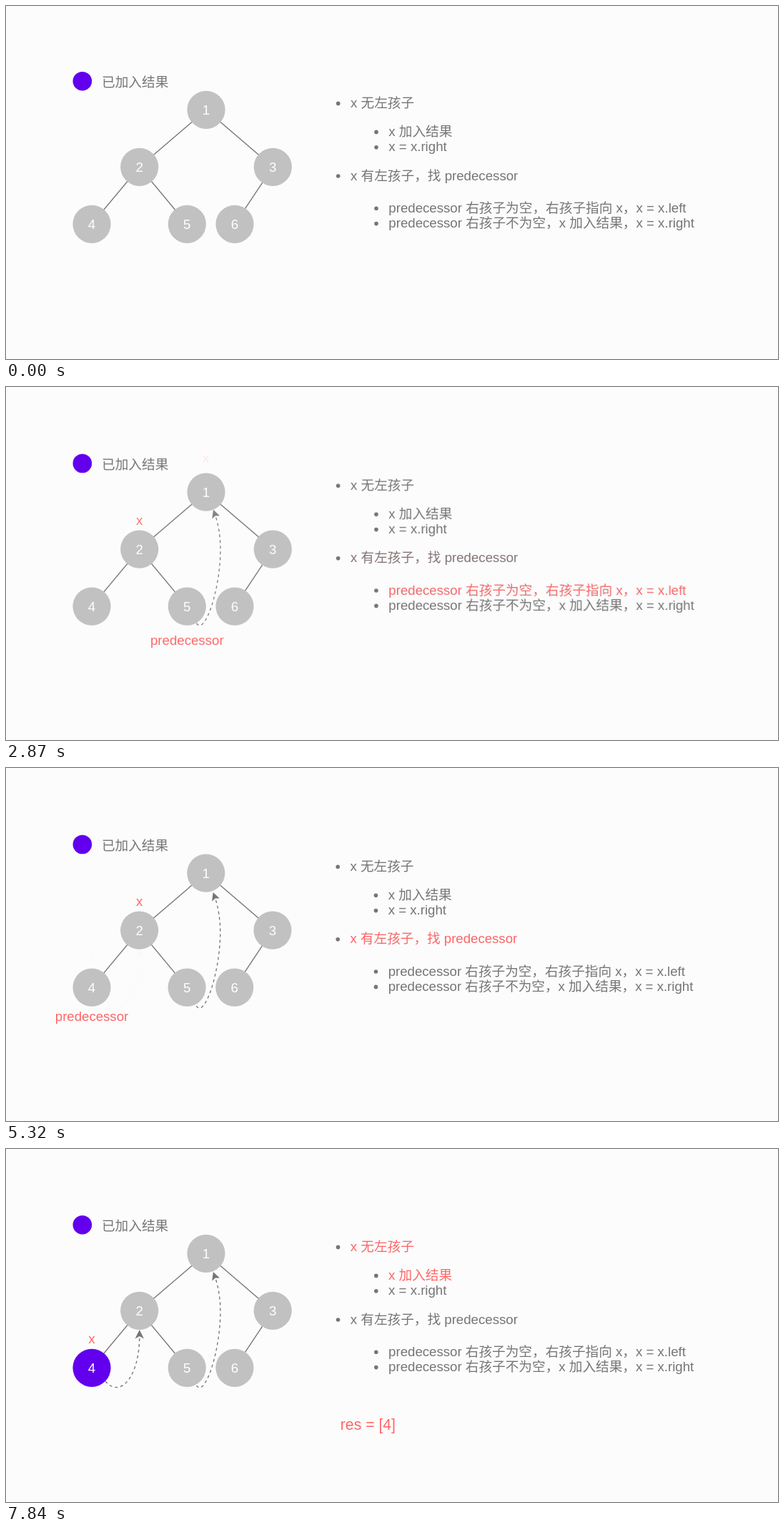
Animation, 1080 px wide and 494 px high, one loop 8000 ms. Source, as an HTML page:

```html
<!DOCTYPE html>
<html lang="zh-CN">
<head>
<meta charset="utf-8">
<style>
  html, body { margin: 0; width: 100%; height: 100%; overflow: hidden; background: #fcfcfc; }
  svg { display: block; width: 1080px; height: 494px; }
  text { font: 18.66px "Liberation Sans", "Noto Sans CJK SC", "Noto Sans CJK", sans-serif; fill: #757575; }
  .mid { text-anchor: middle; }
  .num { fill: #fff; }
  .red { fill: #ff6666; }
  .res { font-size: 21.2px; }
  .edge { stroke: #757575; stroke-width: 1.35; }
  .dash { fill: none; stroke: #757575; stroke-width: 1.35; stroke-dasharray: 4 4; }
  .dot, .head { fill: #757575; }
</style>
</head>
<body>
<svg id="stage" viewBox="0 0 1080 494"></svg>
<script>
const LOOP = 8000, FADE = 980;
const GREY = '#c1c1c1', PURPLE = '#6200ee';

const nodes = {
  1: [280, 145.3], 2: [186.7, 225.3], 3: [373.3, 225.3],
  4: [120, 305.3], 5: [253.3, 305.3], 6: [320, 305.3]
};
const edges = [[1, 2], [1, 3], [2, 4], [2, 5], [3, 6]];

const rules = [
  [482, 142, 'x 无左孩子'],
  [535.3, 182, 'x 加入结果'],
  [535.3, 203.4, 'x = x.right'],
  [482, 243.6, 'x 有左孩子，找 predecessor'],
  [535.3, 288.8, 'predecessor 右孩子为空，右孩子指向 x，x = x.left'],
  [535.3, 310.2, 'predecessor 右孩子不为空，x 加入结果，x = x.right']
];

// Dashed threads from a predecessor back to x: curve, then arrow head
const threads = [
  ['M266.5 330C278 348 300 282 300 227C300 208 297 191 292.8 179', 'M290 171L299 179.5L293 179.5L288.3 183.5Z'],
  ['M139 324C160 349 186.8 317 186.8 261', 'M186.8 252L193 264.5L186.8 261L180.6 264.5Z']
];

// at: fade start, dy and scale: drift of the slide, red: highlighted rules
const scenes = [
  { at: -FADE, dy: 0, scale: 1, red: [] },
  { at: 560, dy: 1, scale: .9986, red: [3], x: [280, 105], pred: [253.3, 359] },
  { at: 2100, dy: 1.8, scale: 1, red: [4], x: [186.7, 191.3], pred: [253.3, 359], threads: 1, lift: -1.1 },
  { at: 3710, dy: 1.8, scale: .9986, red: [3], x: [186.7, 191.3], pred: [120, 352], threads: 1, lift: 1.2 },
  { at: 5250, dy: 1, scale: .9986, red: [4], x: [120, 271.4], pred: [120, 352], threads: 2 },
  { at: 6860, dy: 1, scale: .9995, red: [0, 1], x: [120, 271.4], done: 4, res: 'res = [4]' }
];

const text = (x, y, s, cls = '') => `<text x="${x}" y="${y}" class="${cls}">${s}</text>`;
const disc = (x, y, r, fill) => `<circle cx="${x}" cy="${y}" r="${r}" fill="${fill}"/>`;

function drawScene(s) {
  let out = disc(106.8, 105.2, 13.3, PURPLE) + text(134, 112.8, '已加入结果');
  for (const [a, b] of edges) {
    const [x1, y1] = nodes[a], [x2, y2] = nodes[b];
    out += `<line class="edge" x1="${x1}" y1="${y1}" x2="${x2}" y2="${y2}"/>`;
  }
  for (const n in nodes) {
    const [x, y] = nodes[n];
    out += disc(x, y, 26.6, n == s.done ? PURPLE : GREY) + text(x, y + 7.1, n, 'mid num');
  }
  rules.forEach(([x, y, line], i) => {
    out += disc(x - 17.3, y - 5.6, 2.8, '#757575') + text(x, y, line, s.red.includes(i) ? 'red' : '');
  });
  for (const [curve, head] of threads.slice(0, s.threads ?? (s.done ? 2 : 0)))
    out += `<g transform="translate(0 ${s.lift || 0})"><path class="dash" d="${curve}"/><path class="head" d="${head}"/></g>`;
  if (s.x) out += text(...s.x, 'x', 'mid red');
  if (s.pred) out += text(...s.pred, 'predecessor', 'mid red');
  if (s.res) out += text(468, 392, s.res, 'red res');
  const place = `translate(120 ${s.dy}) scale(${s.scale} 1) translate(-120 0)`;
  return `<g><rect width="1080" height="494" fill="#fcfcfc"/><g transform="${place}">${out}</g></g>`;
}

const stage = document.getElementById('stage');
stage.innerHTML = scenes.map(drawScene).join('');
const layers = [...stage.children];
const start = performance.now();

function frame() {
  const t = (performance.now() - start) % LOOP;
  scenes.forEach((s, i) => {
    const p = Math.min(1, Math.max(0, (t - s.at) / FADE));
    layers[i].setAttribute('opacity', p * p * (3 - 2 * p));
  });
  requestAnimationFrame(frame);
}
frame();
</script>
</body>
</html>
```
